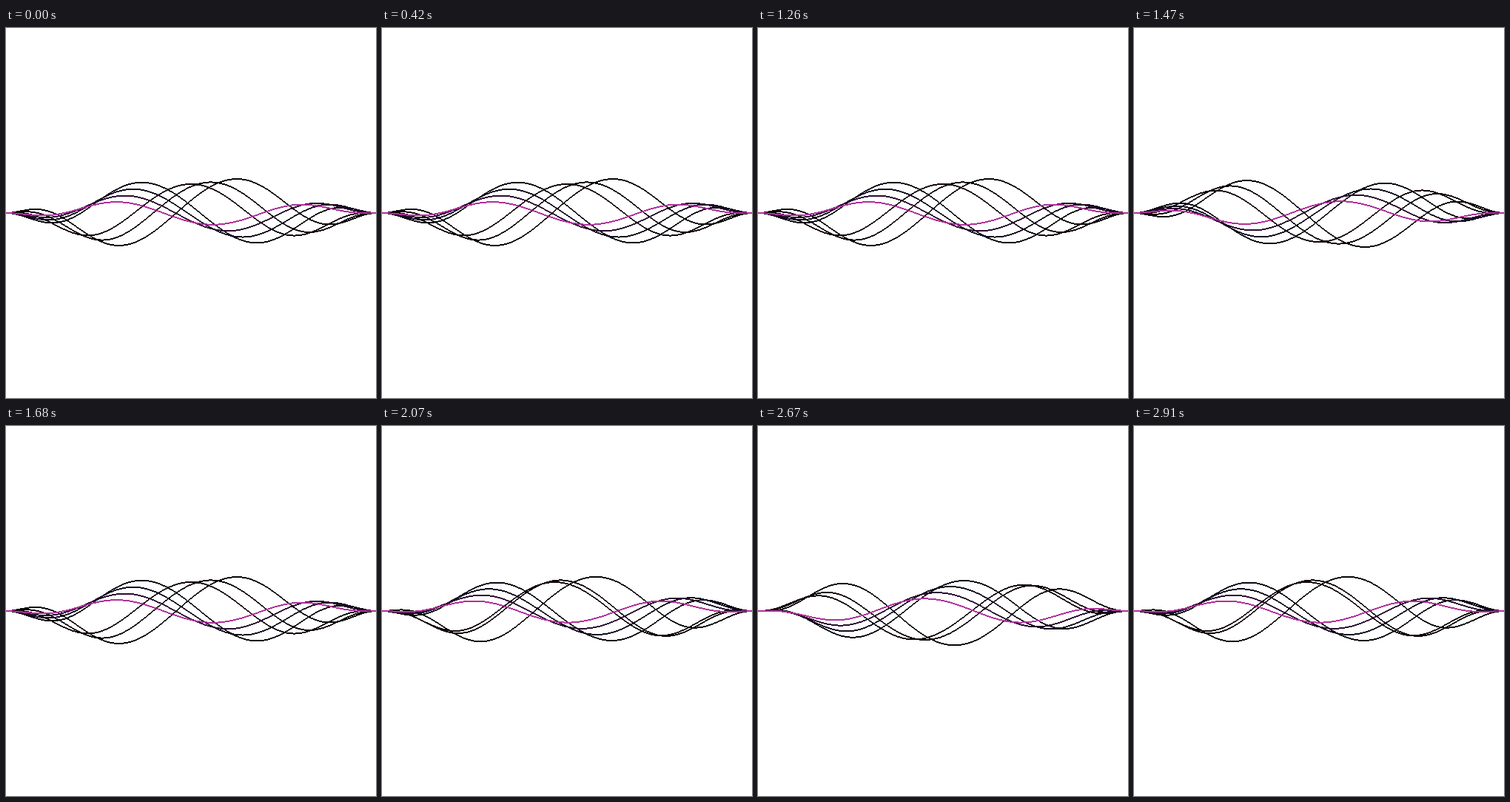
An HTML page with a canvas for the animation above (2.94 s loop, 500x500 px).

```html
<!DOCTYPE html>
<html lang="en">
<head>
<meta charset="utf-8">
<title>Wave lines</title>
<style>
html, body { margin: 0; width: 100%; height: 100%; overflow: hidden; background: #fff; }
canvas { display: block; }
</style>
</head>
<body>
<canvas id="stage" width="500" height="500"></canvas>
<script>
const ctx = document.getElementById('stage').getContext('2d');
const SIZE = 500, MID = SIZE / 2, FRAME = 30, CYCLE = 14, WEIGHT = 2;

// Flat in the middle, fading smoothly to zero at both ends
const envelope = x => (1 - ((x - MID) / MID) ** 4) ** 2;

// A wave travelling right: its crest passes `crest` at step `start`;
// `swell` varies its height and `sway` its speed twice per cycle.
const wave = ([half, crest, start, height, swell, sway]) => (x, step) => {
  const turn = (step - start) / CYCLE * 2 * Math.PI;
  const phase = turn - sway * Math.sin(2 * turn);
  const size = height + swell * Math.cos(2 * turn);
  return size * Math.cos((x - crest) * Math.PI / half - phase);
};

const mix = (a, b, k) => a.map((v, i) => v + (b[i] - v) * k);

const tall = [161, 224, 9.3, -43.2, -3, 0.227];
const low = [134, 195, 9.9, -17.1, -1.6, 0.26];

const lines = [
  [wave([166, 241.5, 11, 46.3, 0, 0]), '#050505'],
  [wave([156, 180.5, 3, -37.5, 4.5, 0.31]), '#100508'],
  [wave([154, 226.5, 5.2, -39, 0, 0.34]), '#14040e'],
  [wave(tall), '#080812'],
  [wave(mix(tall, low, 1 / 3)), '#120a22'],
  [wave(mix(tall, low, 2 / 3)), '#2a0c30'],
  [wave(low), '#b0309a']
];

// Crisp pixel columns, without smoothing
function drawLine(curve, color, step) {
  ctx.fillStyle = color;
  for (let x = 0; x < SIZE; x++) {
    const y = MID - envelope(x) * curve(x, step);
    ctx.fillRect(x, Math.round(y - WEIGHT / 2), 1, WEIGHT);
  }
}

function draw() {
  const step = Math.floor(performance.now() / FRAME) % CYCLE;
  ctx.clearRect(0, 0, SIZE, SIZE);
  for (const [curve, color] of lines) drawLine(curve, color, step);
  requestAnimationFrame(draw);
}
draw();
</script>
</body>
</html>
```
